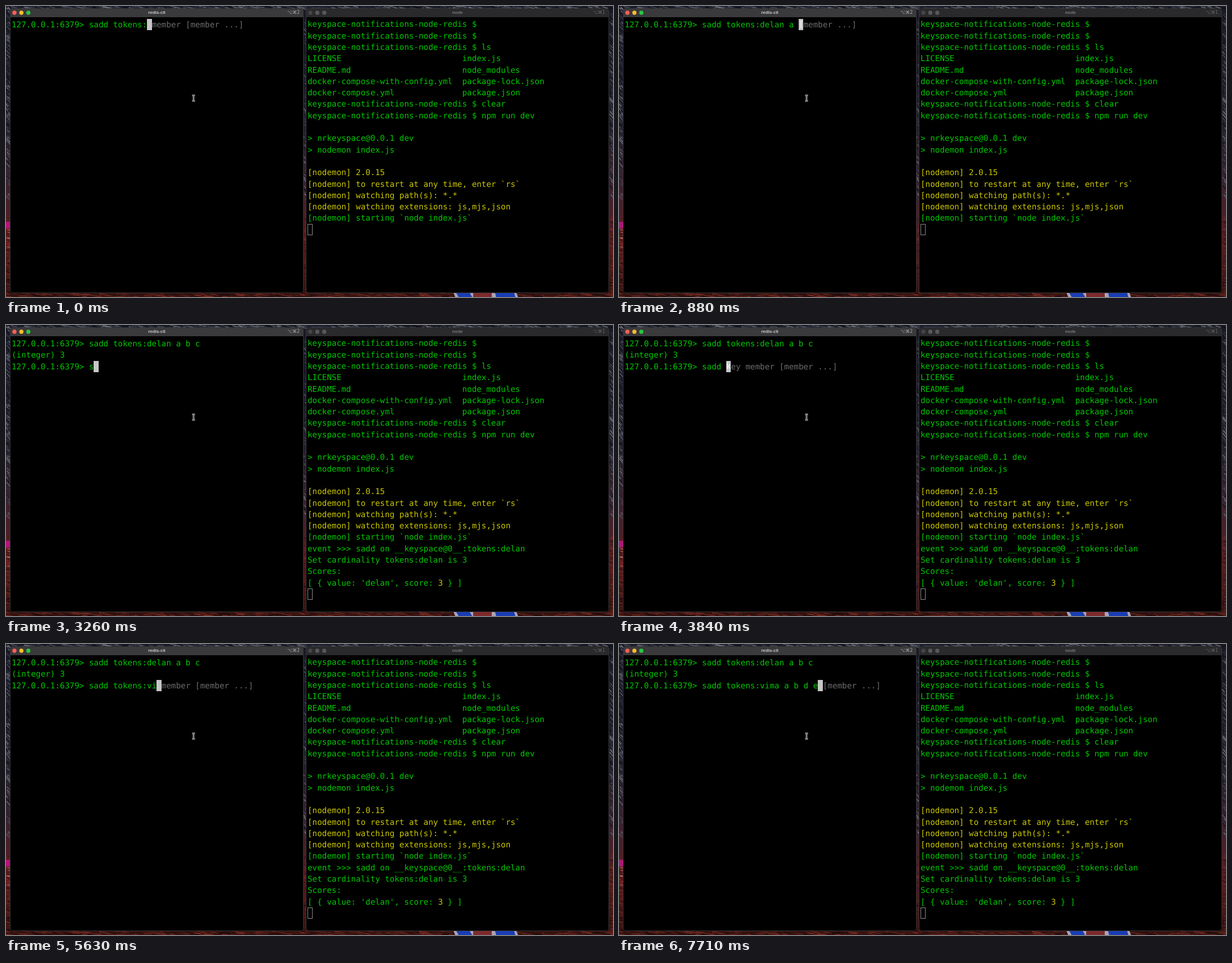
Animation of 1081x518 px, one loop 8000 ms. Source, as an HTML page with a canvas:

```html
<!DOCTYPE html>
<html lang="en">
<head>
<meta charset="utf-8">
<style>
  html, body { margin: 0; width: 100%; height: 100%; overflow: hidden; background: #14151c; }
  canvas { position: absolute; left: 0; top: 0; }
  pre {
    position: absolute; margin: 0; color: #00c800; white-space: pre;
    font: 14.31px/20.3px "DejaVu Sans Mono", monospace;
    text-rendering: geometricPrecision; font-variant-ligatures: none;
  }
  #cli { left: 10px; top: 24px; }
  #log { left: 537px; top: 23.4px; }
  .yellow { color: #cbc800; }
  .hint { color: #6c6c6c; }
  .block, .frame { display: inline-block; position: relative; top: -1px; }
  .block { background: #c7c7c7; color: #fff; }
  .frame { box-shadow: inset 0 0 0 1px #8c8c8c; }
  .bar {
    position: absolute; top: 4px; height: 16px; text-align: center;
    font: bold 8px/16px "Liberation Sans", Arial, sans-serif;
  }
  .bar i { position: absolute; right: 7px; font: 8px/15px "DejaVu Sans", sans-serif; opacity: .75; }
</style>
</head>
<body>
<canvas id="desk" width="1081" height="518"></canvas>
<div class="bar" style="left:7px;width:523px;color:#c9c9c9">redis-cli<i>⌥⌘2</i></div>
<div class="bar" style="left:534px;width:540px;color:#777">node<i>⌥⌘1</i></div>
<pre id="cli"></pre>
<pre id="log"></pre>
<script>
const LOOP = 8000, TICK = 148.4, LEAD = 20, ENTER = 14;
const PROMPT = '127.0.0.1:6379> ';
const FIRST = 'delan', SECOND = 'vima';
const cli = document.getElementById('cli'), log = document.getElementById('log');

// ---------- desktop and windows ----------
const g = document.getElementById('desk').getContext('2d');
let seed = 7;
const rnd = () => (seed = seed * 16807 % 2147483647) / 2147483647;
const pick = list => list[Math.floor(rnd() * list.length)];

function box(x, y, w, h, color) {
  g.fillStyle = color;
  g.fillRect(x, y, w, h);
}

// Slanted bar that shows below the windows.
function slab(x, w, lean, color) {
  g.fillStyle = color;
  g.beginPath();
  g.moveTo(x, 511);
  g.lineTo(x + w, 511);
  g.lineTo(x + w + lean, 518);
  g.lineTo(x + lean, 518);
  g.fill();
}

function streaks(n, x, y, w, h, dx, dy, colors) {
  for (let i = 0; i < n; i++) {
    const sx = x + rnd() * w, sy = y + rnd() * h, len = .4 + rnd();
    g.strokeStyle = pick(colors);
    g.lineWidth = .5 + rnd() * .8;
    g.beginPath();
    g.moveTo(sx, sy);
    g.lineTo(sx + dx * len, sy + dy * len);
    g.stroke();
  }
}

function wallpaper() {
  const sky = g.createLinearGradient(0, 0, 0, 518);
  ['#161824', '#1a1b27', '#20202c', '#3a2230', '#5a1c20', '#35120f']
    .forEach((color, i) => sky.addColorStop(i / 5, color));
  box(0, 0, 1081, 518, sky);
  const stars = ['#3d4050', '#6a6c78', '#7c7d86', '#2a2d3c', '#0b0c14'];
  const rocks = ['#6e2a20', '#1c0a0a', '#842f26', '#4a1a16', '#220c0c'];
  streaks(420, 0, 0, 1081, 4, 14, 3, stars);
  for (const x of [-2, 529, 1074]) {
    streaks(150, x, 0, 7, 340, 6, 7, stars);
    streaks(110, x, 375, 7, 140, 8, 2, rocks);
  }
  streaks(420, 0, 511, 1081, 7, 16, 2, rocks);
  box(0, 384, 7, 12, '#b8127a');
  streaks(24, 0, 396, 7, 34, 7, 1, ['#a3241f', '#7c1a1a', '#c0908c']);
  slab(797, 112, 3, '#a9a4b4');
  slab(802, 24, 4, '#1a3db4');
  slab(832, 33, 0, '#7e2a2c');
  slab(871, 34, 2, '#1a3db4');
}

function win(x, w, bar, lights) {
  g.beginPath();
  g.roundRect(x, 4, w, 507, 5);
  g.fillStyle = '#000';
  g.fill();
  g.save();
  g.clip();
  box(x, 4, w, 16, bar);
  g.restore();
  g.beginPath();
  g.roundRect(x + .5, 4.5, w - 1, 506, 5);
  g.strokeStyle = '#343436';
  g.lineWidth = 1;
  g.stroke();
  lights.forEach((color, i) => {
    g.fillStyle = color;
    g.beginPath();
    g.arc(x + 8 + i * 12.4, 12, 3.7, 0, 7);
    g.fill();
  });
}

function pointer(x, y) {
  for (const [color, width] of [['#d8d8d8', 2.6], ['#222', .8]]) {
    g.strokeStyle = color;
    g.lineWidth = width;
    g.stroke(new Path2D(`M${x - 2.5} ${y - 5}h5M${x - 2.5} ${y + 5}h5M${x} ${y - 5}v10M${x - 1.5} ${y}h3`));
  }
}

wallpaper();
win(7, 523, '#3a393b', ['#fe5f57', '#febc2e', '#28c840']);
win(534, 540, '#2a292b', ['#454446', '#58575a', '#58575a']);
pointer(334, 164);

// ---------- terminal contents ----------
const span = (text, name) => {
  const el = document.createElement('span');
  el.className = name;
  el.textContent = text;
  return el;
};

const SHELL = 'keyspace-notifications-node-redis $ ';
const files = (a, b) => a.padEnd(32) + b + '\n';
const START = [
  SHELL + '\n' + SHELL + '\n' + SHELL + 'ls\n',
  files('LICENSE', 'index.js'),
  files('README.md', 'node_modules'),
  files('docker-compose-with-config.yml', 'package-lock.json'),
  files('docker-compose.yml', 'package.json'),
  SHELL + 'clear\n' + SHELL + 'npm run dev\n\n',
  '> nrkeyspace@0.0.1 dev\n> nodemon index.js\n\n',
].join('');
const NODEMON = ['2.0.15', 'to restart at any time, enter `rs`', 'watching path(s): *.*',
  'watching extensions: js,mjs,json'].map(s => `[nodemon] ${s}\n`).join('');
const EVENT = `event >>> sadd on __keyspace@0__:tokens:${FIRST}
Set cardinality tokens:${FIRST} is 3
Scores:
[ { value: '${FIRST}', score: `;

function drawLog(done) {
  log.replaceChildren(START, span(NODEMON, 'yellow'), '[nodemon] starting `node index.js`\n',
    ...(done ? [EVENT, span('3', 'yellow'), ' } ]\n'] : []), span(' ', 'frame'));
}

// Typing bursts: text, first tick, and ticks it takes at an even pace.
const ONE = [['sadd tokens:', 0, 1], [FIRST + ' a ', 1, 6], ['b ', 8, 2], ['c', 12, 1]];
const TWO = [['s', 22, 1], ['add ', 24, 3], ['tokens', 28, 4], [':', 33, 1],
  [SECOND.slice(0, 3), 38, 2], [SECOND.slice(3) + ' ', 41, 1], ['a b ', 46, 3], ['d e', 50, 3]];

const typed = (bursts, tick) => bursts.map(([text, first, ticks]) => {
  const part = Math.min(1, Math.max(0, (tick - first + 1) / ticks));
  return text.slice(0, Math.round(text.length * part));
}).join('');

function hint(cmd) {
  const [name, ...args] = cmd.split(' ').filter(Boolean);
  if (name !== 'sadd') return '';
  const rest = [...['key', 'member'].slice(args.length), '[member ...]'].join(' ');
  return (cmd.endsWith(' ') ? '' : ' ') + rest;
}

let shown = -1;
function draw(t) {
  const tick = Math.floor((t + LEAD) / TICK);
  if (tick === shown) return;
  shown = tick;
  const done = tick >= ENTER;
  const cmd = typed(done ? TWO : ONE, tick), tail = hint(cmd);
  cli.replaceChildren(done ? `${PROMPT}${typed(ONE, tick)}\n(integer) 3\n` : '', PROMPT + cmd,
    span(tail[0] || ' ', 'block'), span(tail.slice(1), 'hint'));
  drawLog(done);
}

const begin = performance.now();
function frame() {
  draw((performance.now() - begin) % LOOP);
  requestAnimationFrame(frame);
}
frame();
</script>
</body>
</html>
```
